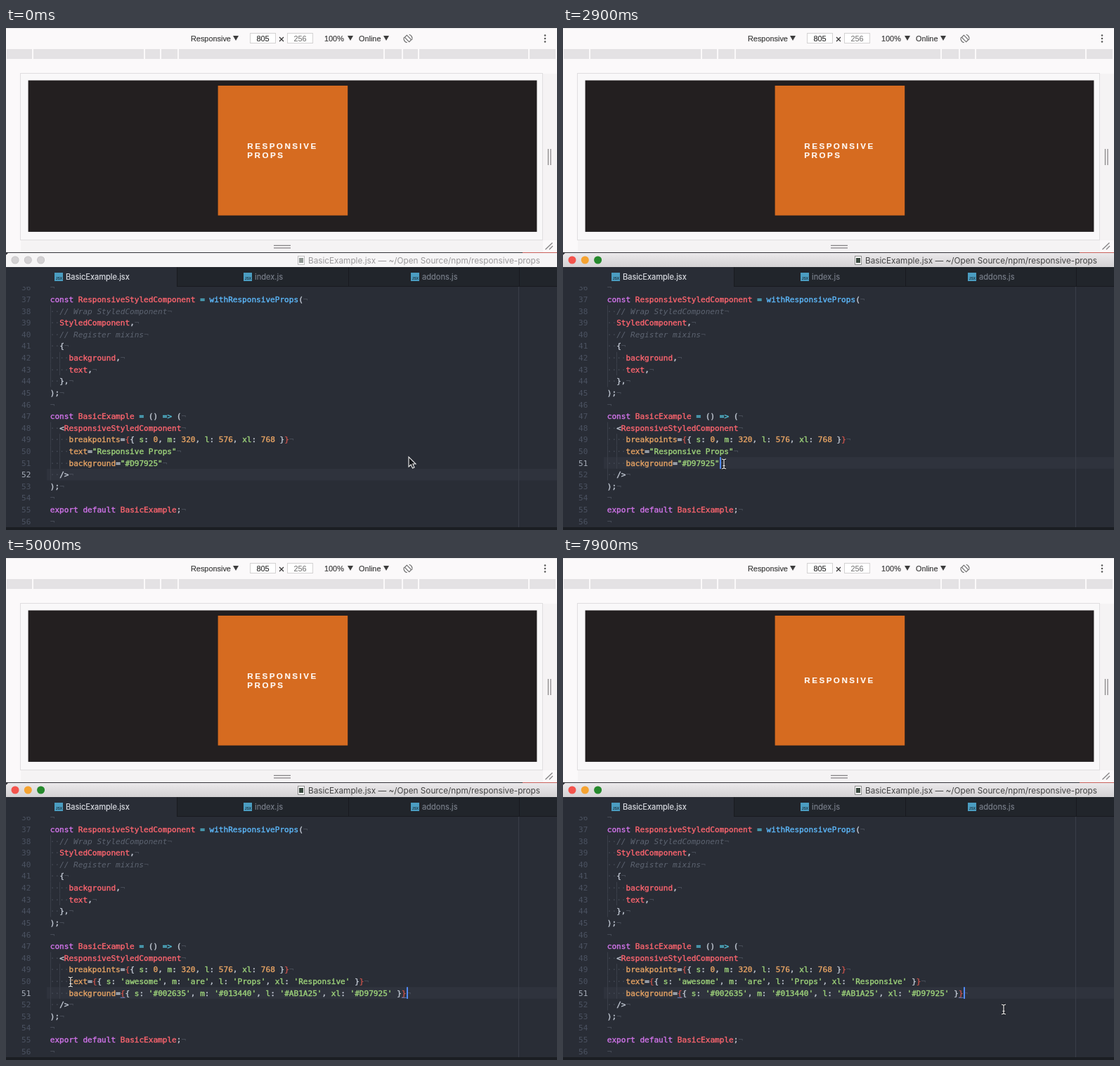
These frames come from a looping animation (784x714 px, 8000 ms). An HTML page with a canvas:

```html
<!DOCTYPE html>
<html lang="en">
<head>
<meta charset="utf-8">
<title>Responsive props</title>
<style>
html, body { margin: 0; width: 100%; height: 100%; overflow: hidden; background: #fbf9fa; }
canvas { display: block; }
</style>
</head>
<body>
<canvas id="stage" width="784" height="714"></canvas>
<script>
const ctx = document.getElementById('stage').getContext('2d');
const LOOP = 8000, CLICK = 1800, DRAG = 3400, PASTE = 4700, SAVE = 7500;
const ZOOM = .923;
const CODE_X = 62.8, CHAR = 12 * ZOOM * .602, ROW = 18 * ZOOM, FIRST = 36;
const MONO = 12 * ZOOM + 'px "DejaVu Sans Mono", monospace';
const UI = '"Liberation Sans", Arial, sans-serif';
const TITLE = 'Inter, sans-serif';

// Token colours: each piece of a line is "~" + key + text.
const INK = {
  p: '#cf73e8', r: '#fa646e', b: '#5cb6f8', o: '#e4a263', g: '#9dd27a',
  c: '#52bdd6', w: '#c0c7d2', d: '#5d6471', e: '#c4524b'
};
const pairs = (...list) => '~e{~w{ ' + list.map(([key, ink, value]) =>
  `~g${key}~w: ~${ink}${value}`).join('~w, ') + '~w }~e}';
const BREAKS = pairs(['s', 'o', 0], ['m', 'o', 320], ['l', 'o', 576], ['xl', 'o', 768]);
const CODE = [
  '',
  '~pconst ~rResponsiveStyledComponent ~c= ~bwithResponsiveProps~w(',
  '  ~d// Wrap StyledComponent',
  '  ~rStyledComponent~w,',
  '  ~d// Register mixins',
  '  ~w{',
  '    ~rbackground~w,',
  '    ~rtext~w,',
  '  ~w},',
  '~w);',
  '',
  '~pconst ~rBasicExample ~c= ~w() ~c=> ~w(',
  '  ~w<~rResponsiveStyledComponent',
  '    ~obreakpoints~w=' + BREAKS,
  '    ~otext~w=~g"Responsive Props"',
  '    ~obackground~w=~g"#D97925"',
  '  ~w/>',
  '~w);',
  '',
  '~pexport default ~rBasicExample~w;',
  ''
];
const PASTED = {
  50: '    ~otext~w=' + pairs(['s', 'g', "'awesome'"], ['m', 'g', "'are'"],
    ['l', 'g', "'Props'"], ['xl', 'g', "'Responsive'"]),
  51: '    ~obackground~w=' + pairs(['s', 'g', "'#002635'"], ['m', 'g', "'#013440'"],
    ['l', 'g', "'#AB1A25'"], ['xl', 'g', "'#D97925'"])
};

// Pointer stops: time, x, y
const PATH = [
  [0, 573, 610], [100, 573, 610], [1200, 219, 622], [1400, 219, 622], [1800, 229, 620],
  [DRAG, 229, 620], [4300, 91.5, 603], [5500, 92, 603], [6400, 627, 650],
  [7300, 627, 650], [7700, 627, 642], [LOOP, 627, 642]
];

const rowTop = n => 377.7 + (n - 37) * ROW;
const colX = c => CODE_X + c * CHAR;

function box(x, y, w, h, fill, border) {
  ctx.fillStyle = fill;
  ctx.fillRect(x, y, w, h);
  if (border) {
    ctx.strokeStyle = border;
    ctx.lineWidth = 1;
    ctx.strokeRect(x + .5, y + .5, w - 1, h - 1);
  }
}
function line(color, width, ...p) {
  ctx.strokeStyle = color;
  ctx.lineWidth = width;
  ctx.beginPath();
  for (let i = 0; i < p.length; i += 4) {
    ctx.moveTo(p[i], p[i + 1]);
    ctx.lineTo(p[i + 2], p[i + 3]);
  }
  ctx.stroke();
}
function poly(fill, ...p) {
  ctx.fillStyle = fill;
  ctx.beginPath();
  for (let i = 0; i < p.length; i += 2) ctx.lineTo(p[i], p[i + 1]);
  ctx.closePath();
  ctx.fill();
}
function disc(x, y, r, fill) {
  ctx.fillStyle = fill;
  ctx.beginPath();
  ctx.arc(x, y, r, 0, Math.PI * 2);
  ctx.fill();
}
function text(str, x, y, fill, font, weight = 0) {
  ctx.font = font;
  ctx.fillStyle = ctx.strokeStyle = fill;
  ctx.fillText(str, x, y);
  if (weight) {
    ctx.lineWidth = weight;
    ctx.strokeText(str, x, y);
  }
}

function pointer(t) {
  const i = PATH.findIndex(stop => stop[0] > t);
  const [t0, x0, y0] = PATH[i - 1], [t1, x1, y1] = PATH[i];
  const k = (t - t0) / (t1 - t0), e = k * k * (3 - 2 * k);
  return { x: x0 + (x1 - x0) * e, y: y0 + (y1 - y0) * e };
}

function toolbar() {
  const font = '10.9px ' + UI;
  box(0, 0, 784, 321, '#fbf9fa');
  box(0, 0, 784, 1, '#e9e7e8');
  text('Responsive', 263, 18.5, '#3d3d3d', font, .2);
  text('100%', 453, 18.5, '#3d3d3d', font, .2);
  text('Online', 502, 18.5, '#3d3d3d', font, .2);
  for (const x of [323, 486, 537]) poly('#3d3d3d', x, 11, x + 8, 11, x + 4, 18);
  box(347, 7, 37, 15, '#fff', '#d4d2d3');
  box(400, 7, 37, 15, '#fff', '#d4d2d3');
  text('805', 356.5, 18.5, '#333', font, .2);
  text('256', 409.5, 18.5, '#6c6c6c', font);
  line('#333', 1.2, 389, 13, 395, 19, 395, 13, 389, 19);
  for (const y of [10.5, 15, 19.5]) disc(767, y, 1.3, '#5a5a5a');

  ctx.save();
  ctx.translate(572, 15);
  ctx.rotate(-Math.PI / 4);
  ctx.strokeStyle = '#666';
  ctx.lineWidth = 1.1;
  ctx.strokeRect(-2.2, -4.5, 4.4, 9);
  ctx.beginPath();
  ctx.arc(0, 0, 6, -.5, 1.1);
  ctx.moveTo(-5.3, 2.9);
  ctx.arc(0, 0, 6, 2.64, 4.24);
  ctx.stroke();
  ctx.restore();

  const marks = [1, 39, 198, 221, 246, 539, 565, 588, 745, 784];
  for (let i = 0; i < 9; i++) box(marks[i], 30, marks[i + 1] - marks[i] - 2, 14, '#e4e2e4');
}

function preview(saved) {
  box(764, 65, 20, 237, '#f5f3f4');
  box(21, 302, 743, 18, '#f5f3f4');
  box(20, 64, 744, 238, '#f9f8f9', '#e0dee0');
  box(31.6, 74.5, 723.8, 215.4, '#231f20');
  box(301.6, 82, 200 * ZOOM, 200 * ZOOM, '#d66b20');
  ctx.letterSpacing = '2.5px';
  const font = 'bold 11.6px ' + UI;
  const words = saved ? ['RESPONSIVE'] : ['RESPONSIVE', 'PROPS'];
  words.forEach((word, i) =>
    text(word, 343.3, 178.1 + (i - (words.length - 1) / 2) * 13, '#fff8f3', font, .2));
  ctx.letterSpacing = '0px';
  line('#858385', 1.2, 771.5, 172, 771.5, 195, 775, 172, 775, 195);
  line('#858385', 1.2, 381, 309.3, 405, 309.3, 381, 312.8, 405, 312.8);
  line('#858385', 1.3, 767.5, 315, 777.5, 305.5, 773, 315, 778, 310);
}

function badge(x) {
  box(x, 348, 12, 12, '#4b9dc1');
  text('JSX', x + 1.7, 357.5, '#1f3644', 'bold 5px ' + UI);
}

function windowFrame(active) {
  box(0, 320, 784, 21, '#f6f5f6');
  if (active) {
    const shade = ctx.createLinearGradient(0, 320, 0, 341);
    shade.addColorStop(0, '#ebe9eb');
    shade.addColorStop(1, '#d3d1d3');
    box(0, 320, 784, 21, shade);
  }
  box(0, 319, 735, 1, '#34343a');
  box(735, 319, 49, 1, '#c9615c');
  poly('#34343a', 0, 319, 4, 319, 0, 323);
  const lights = active ? ['#f4544d', '#f5a331', '#268a2d'] : ['#d3d1d3', '#d3d1d3', '#d3d1d3'];
  lights.forEach((color, i) => {
    disc(13 + i * 18.3, 330, 5.5, active ? color : '#c2c0c2');
    disc(13 + i * 18.3, 330, 4.8, color);
  });
  ctx.globalAlpha = active ? 1 : .55;
  box(415, 324, 10, 13, '#fff', '#8c8c8c');
  box(417, 327, 6, 7, '#3b4a40');
  ctx.globalAlpha = 1;
  text('BasicExample.jsx — ~/Open Source/npm/responsive-props', 430, 335,
    active ? '#434343' : '#9b999b', '11.75px ' + TITLE);

  box(0, 340, 784, 28, '#21252b');
  box(0, 340, 243, 28, '#292d36');
  for (const x of [243, 487, 730]) box(x, 340, 1, 28, '#181a1f');
  box(243, 367, 541, 1, '#181a1f');
  const tabs = [['BasicExample.jsx', 69, '#d9dce2'], ['index.js', 338, '#777d88'],
    ['addons.js', 576, '#777d88']];
  for (const [name, x, color] of tabs) {
    badge(x);
    text(name, x + 16, 358, color, '11.1px ' + TITLE, .2);
  }
}

function codeLine(source, n, current) {
  const y = 390 + (n - 37) * ROW;
  const indent = source.search(/[^ ]|$/);
  text(n, 22, y, n === current ? '#a7aeba' : '#4b5261', MONO);
  for (let c = 0; c < indent; c += 2) {
    box(Math.round(colX(c)), rowTop(n), 1, ROW, '#3a3f49');
    text('··', colX(c), y, '#464c57', MONO);
  }
  let col = indent;
  for (const token of source.trimStart().split('~').slice(1)) {
    const ink = token[0], str = token.slice(1), comment = ink === 'd';
    text(str, colX(col), y, INK[ink], (comment ? 'italic ' : '') + MONO, comment ? 0 : .4);
    col += str.length;
  }
  text('¬', colX(col), y, '#4a505b', MONO);
}

function editor(t, mouse) {
  const pasted = t >= PASTE, dragging = t >= DRAG && !pasted;
  let current = t < CLICK ? 52 : 51, caret = pasted ? 76 : 24;
  if (dragging) {
    current = mouse.y < rowTop(51) ? 50 : 51;
    caret = Math.max(4, Math.min(24, Math.round((mouse.x - CODE_X) / CHAR)));
  }
  box(0, 368, 784, 346, '#292d36');
  ctx.save();
  ctx.beginPath();
  ctx.rect(0, 368, 784, 343);
  ctx.clip();
  box(58, rowTop(current), 726, ROW, '#2f333d');
  if (dragging && current === 50) {
    box(colX(caret), rowTop(50), 784, ROW, '#404553');
    box(CODE_X, rowTop(51), colX(24) - CODE_X, ROW, '#404553');
  } else if (dragging) {
    box(colX(caret), rowTop(51), colX(24) - colX(caret), ROW, '#404553');
  }
  box(729, 368, 1, 343, '#3a3e48');
  CODE.forEach((source, i) => {
    const n = FIRST + i;
    codeLine(pasted && PASTED[n] || source, n, current);
  });
  if (pasted) {
    for (const c of [15, 75]) box(colX(c), rowTop(51) + 14.5, CHAR, 1, '#6580c0');
  }
  const since = pasted ? t - PASTE : t - CLICK;
  if (since >= 0 && (dragging || since % 800 < 400)) {
    box(Math.round(colX(caret)), rowTop(current), 2, ROW, '#528bff');
  }
  ctx.restore();
  box(0, 710, 784, 4, '#1b1e23');
}

function arrow(x, y) {
  ctx.save();
  ctx.translate(x, y);
  poly('#15171b', 0, 0, 0, 14, 3.2, 11, 5.5, 16, 8, 15, 5.8, 10, 10, 10);
  ctx.strokeStyle = '#eee';
  ctx.lineWidth = 1.1;
  ctx.stroke();
  ctx.restore();
}
function beam(x, y) {
  const shape = [x, y - 6, x, y + 6, x - 3, y - 7, x, y - 6, x, y - 6, x + 3, y - 7,
    x - 3, y + 7, x, y + 6, x, y + 6, x + 3, y + 7, x - 1.5, y + 2.5, x + 1.5, y + 2.5];
  line('#14161a', 2.8, ...shape);
  line('#f2f2f2', 1.2, ...shape);
}

function draw(now) {
  const t = now % LOOP, mouse = pointer(t), active = t >= CLICK;
  toolbar();
  preview(t >= SAVE);
  windowFrame(active);
  editor(t, mouse);
  (active ? beam : arrow)(mouse.x, mouse.y);
}

let start;
function tick(now) {
  start ??= now;
  draw(now - start);
  requestAnimationFrame(tick);
}
draw(0);
requestAnimationFrame(tick);
</script>
</body>
</html>
```
